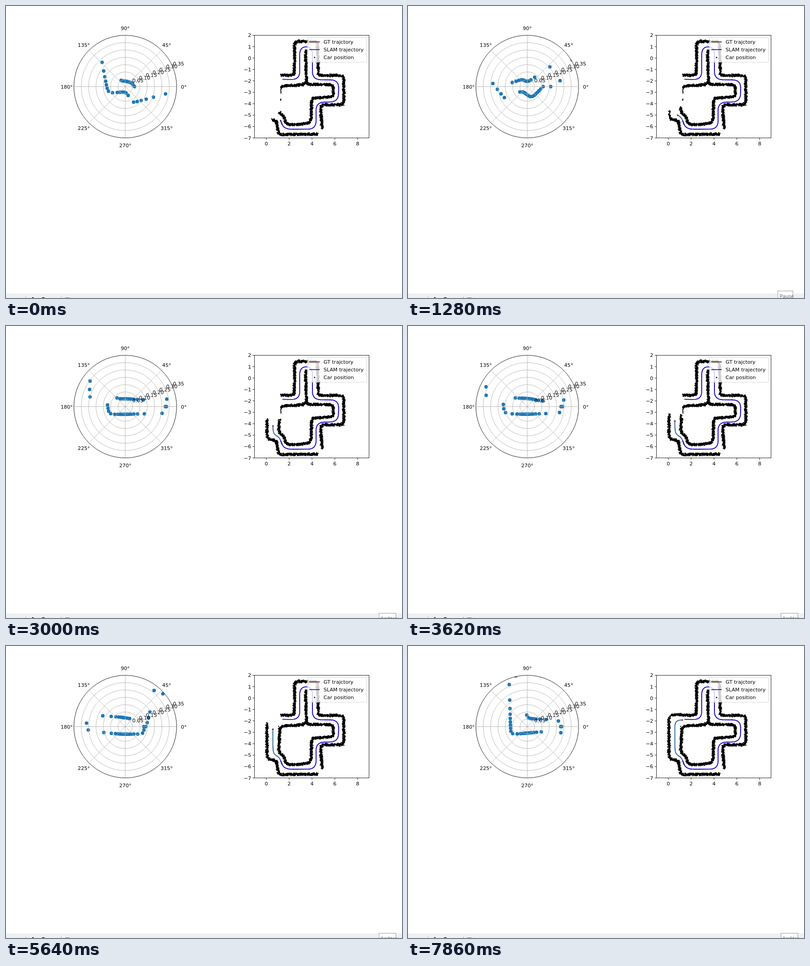
Animation, 871 px wide and 643 px high, one loop 8000 ms. Source, as an HTML page with a canvas:

```html
<!DOCTYPE html>
<html lang="en">
<head>
<meta charset="utf-8">
<title>Lidar scan and SLAM map</title>
<style>
  html, body { margin: 0; width: 871px; height: 643px; overflow: hidden; background: #fff; }
  canvas, svg { position: absolute; left: 0; top: 0; }
  text { font: 11.1px "DejaVu Sans", sans-serif; }
  .mid { text-anchor: middle; }
  .end { text-anchor: end; }
  .grid { fill: none; stroke: #b0b0b0; stroke-width: .89; }
  .axis { fill: none; stroke: #000; stroke-width: .89; }
  .path { fill: none; stroke-width: 1.67; stroke-linejoin: round; }
  .tip rect { fill: #fff; stroke: #9a9a9a; }
  .tip text { font: 11px "Open Sans", sans-serif; fill: #575757; }
</style>
</head>
<body>
<canvas id="stage" width="871" height="643"></canvas>
<svg width="871" height="643" viewBox="0 0 871 643">
  <g id="polar"></g>
  <g id="chart"></g>
  <g id="legend">
    <rect x="663" y="69.5" width="130" height="54.5" rx="2.2" fill="#fff" fill-opacity=".8" stroke="#ccc" stroke-opacity=".8"/>
    <path class="path" stroke="#5a0a0a" d="M667 79H690"/>
    <path class="path" stroke="#00f" d="M667 96H690"/>
    <circle cx="678.7" cy="113.3" r="1.6" fill="#700"/>
    <text x="698.5" y="83">GT trajctory</text>
    <text x="698.5" y="100">SLAM trajectory</text>
    <text x="698.5" y="117">Car position</text>
  </g>
  <g id="toolbar">
    <rect y="633" width="871" height="10" fill="#f0f0f0"/>
    <path d="M43.5 640V643M121.5 640V643" stroke="#a8a8a8"/>
    <path d="M56.5 643L59 641L61.5 643Z"/>
    <path d="M78.5 643.5Q82 641 85.5 643.5" fill="none" stroke="#000" stroke-width="1.3"/>
    <path d="M130 642.5H140" stroke="#777"/>
    <path d="M3 642.5H6M27 642.5H30" stroke="#ddd"/>
  </g>
  <g class="tip" id="pause"><rect x="813.5" y="627.5" width="33" height="20"/><text x="817.5" y="643">Pause</text></g>
  <g class="tip" id="stop"><rect x="820.5" y="632.5" width="37" height="20"/><text x="823.5" y="648">Arrêter</text></g>
</svg>
<script>
const LOOP = 8000, CX = 262.3, CY = 177.5, R = 113, RING = R / 7;
const RAYS = 36, SCALE = 1.283, SPEED = .0136, SWEEP = 130, BEAT = 301.5;
const $ = id => document.getElementById(id);
const rad = deg => deg * Math.PI / 180;
const mix = (a, b, u) => a + (b - a) * u;
const pairs = line => line.slice(1).map((b, i) => [line[i], b]);
const gap = (a, b) => Math.hypot(b[0] - a[0], b[1] - a[1]);
const toward = (a, b, d) => {
  const u = Math.min(.5, d / gap(a, b));
  return [mix(a[0], b[0], u), mix(a[1], b[1], u)];
};

// polyline through the given corners, each rounded off
function rounded(corners, radius) {
  const line = [corners[0]];
  for (let i = 1; i < corners.length - 1; i++) {
    const c = corners[i], a = toward(c, corners[i - 1], radius), b = toward(c, corners[i + 1], radius);
    for (let u = 0; u <= 1; u += .125) {
      line.push([0, 1].map(k => mix(mix(a[k], c[k], u), mix(c[k], b[k], u), u)));
    }
  }
  return [...line, corners[corners.length - 1]];
}

const outer = rounded([[695, 270], [692, 218], [743, 217], [743, 153], [687, 153], [685, 78],
  [635, 78], [634, 153], [574, 151], [574, 249], [595, 252], [600, 283], [686, 282]], 8);
const inner = rounded([[659, 98], [661, 173], [720, 173], [720, 200], [672, 203], [671, 256],
  [648, 261], [617, 261], [609, 239], [600, 237], [602, 177], [656, 173], [661, 165]], 8);
const track = rounded([[608, 161.5], [646, 162], [646, 90], [674, 90], [674, 162], [732, 163],
  [731, 211], [682, 212], [682, 271], [612, 271.5], [604, 252]], 18);
const route = rounded([[604, 252], [600.5, 245], [589, 238], [587, 226], [587, 163], [620, 163]], 14);

// time, heading at the start and at the end of a sweep
const HEADINGS = [[0, 98, 105], [1280, 122, 136], [2200, 90, 91], [3620, 77, 92],
  [5640, 68, 91], [6640, 52, 72], [7860, 0, 2]];

function carAt(t) {
  let s = Math.max(0, t) * SPEED;
  for (const [a, b] of pairs(route)) {
    const d = gap(a, b);
    if (s < d) return [mix(a[0], b[0], s / d), mix(a[1], b[1], s / d)];
    s -= d;
  }
}

function headingAt(t, u) {
  const [a, b] = pairs(HEADINGS).find(p => t < p[1][0]) || pairs(HEADINGS).pop();
  const k = Math.min(1, (t - a[0]) / (b[0] - a[0]));
  return mix(mix(a[1], b[1], k), mix(a[2], b[2], k), Math.sin(u * Math.PI / 2));
}

const edges = [outer, inner].flatMap(pairs);
function cast([x, y], dir) {
  const dx = Math.cos(rad(dir)), dy = -Math.sin(rad(dir));
  let best = Infinity;
  for (const [a, b] of edges) {
    const ex = b[0] - a[0], ey = b[1] - a[1], det = dx * ey - dy * ex;
    if (!det) continue;
    const px = a[0] - x, py = a[1] - y;
    const dist = (px * ey - py * ex) / det, s = (px * dy - py * dx) / det;
    if (dist > 0 && s >= 0 && s <= 1) best = Math.min(best, dist);
  }
  return best;
}

let seed = 7;
const rnd = () => (seed = (seed * 16807) % 2147483647) / 2147483647;
const noise = () => (rnd() + rnd() - 1) * 3.6;

// noisy range hits along a wall
function scatter([a, b]) {
  const n = Math.ceil(gap(a, b) * 3.5);
  return Array.from({ length: n }, (_, i) =>
    [mix(a[0], b[0], i / n) + noise(), mix(a[1], b[1], i / n) + noise()]);
}

// a hit on the unmapped stretch appears once the car comes near it
const unmapped = ([x, y]) => y < 256 && x < (y < 234 ? 604 : 594);
function seenAt(dot) {
  const reach = 15.5 + rnd() * 6;
  let t = 0;
  while (t < LOOP && gap(carAt(t), dot) > reach) t += 100;
  return t;
}

const g = $("stage").getContext("2d");
const disc = (c, x, y, r) => { c.beginPath(); c.arc(x, y, r, 0, 7); c.fill(); };

const known = document.createElement("canvas");
known.width = 871;
known.height = 643;
const fresh = [];
for (const dot of edges.flatMap(scatter)) {
  if (unmapped(dot)) fresh.push([...dot, seenAt(dot)]);
  else disc(known.getContext("2d"), ...dot, 1.3);
}

function makePolar() {
  let s = "";
  for (let a = 0; a < 360; a += 45) {
    const c = Math.cos(rad(a)), n = Math.sin(rad(a));
    s += `<path class="grid" d="M${CX} ${CY}L${CX + R * c} ${CY - R * n}"/>`;
    s += `<text class="mid" x="${CX + 128.8 * c}" y="${CY + 4 - 129 * n}">${a}°</text>`;
  }
  for (let i = 1; i <= 7; i++) {
    const r = RING * i, x = CX + r * Math.cos(rad(22.5)), y = CY - r * Math.sin(rad(22.5));
    s += `<circle class="${i < 7 ? "grid" : "axis"}" cx="${CX}" cy="${CY}" r="${r}"/>`;
    s += `<text x="${x + .5}" y="${y - 3}">${(i * .05).toFixed(2)}</text>`;
  }
  $("polar").innerHTML = s;
}

function makeChart() {
  const d = "M" + track.join("L");
  let s = `<path class="path" stroke="#5a0a0a" d="${d}"/><path class="path" stroke="#00f" stroke-opacity=".9" d="${d}"/>`;
  s += `<rect class="axis" x="546.5" y="64.5" width="252" height="226"/>`;
  for (let v = 0; v <= 8; v += 2) {
    const x = 572.5 + 25.13 * v;
    s += `<path class="axis" d="M${x} 290.5v4"/><text class="mid" x="${x}" y="307">${v}</text>`;
  }
  for (let v = -7; v <= 2; v++) {
    const y = 114.7 - 25.12 * v;
    s += `<path class="axis" d="M546.5 ${y}h-4"/><text class="end" x="539.3" y="${y + 4}">${v < 0 ? "\u2212" : ""}${Math.abs(v)}</text>`;
  }
  $("chart").innerHTML = s;
}

function drawScan(t) {
  g.save();
  g.beginPath();
  g.arc(CX, CY, R, 0, 7);
  g.clip();
  g.fillStyle = "#1f77b4";
  for (let i = 0; i < RAYS; i++) {
    const u = i / (RAYS - 1), a = u * 360;
    const r = SCALE * cast(carAt(t - SWEEP * (1 - u)), headingAt(t, u) - a);
    if (r < R + 5) disc(g, CX + r * Math.cos(rad(a)), CY - r * Math.sin(rad(a)), 3.9);
  }
  g.restore();
}

function drawTrail(t) {
  g.beginPath();
  g.moveTo(606.5, 261);
  for (let s = 0; s < t; s += 40) g.lineTo(...carAt(s));
  g.lineTo(...carAt(t));
  for (const [width, colour] of [[2, "#a05a5a"], [1.7, "#1f77b4"]]) {
    g.lineWidth = width;
    g.strokeStyle = colour;
    g.stroke();
  }
}

function draw(t) {
  g.clearRect(0, 0, 871, 643);
  drawScan(t);
  g.drawImage(known, 0, 0);
  g.fillStyle = "#000";
  for (const [x, y, seen] of fresh) if (seen <= t) disc(g, x, y, 1.3);
  drawTrail(t);
  g.fillStyle = "#800000";
  disc(g, ...carAt(t), 1.6);
  $("pause").style.display = t >= 600 && t < 2700 ? "" : "none";
  $("stop").style.display = t >= 2700 ? "" : "none";
}

// two refreshes per beat, the second 100 ms after the first
function refreshTime(now) {
  const beat = Math.floor(now / BEAT) * BEAT;
  return now - beat < 100 ? beat : beat + 100;
}

makePolar();
makeChart();
let shown = -1;
function tick() {
  const t = refreshTime(performance.now() % LOOP);
  if (t !== shown) draw(shown = t);
  requestAnimationFrame(tick);
}
tick();
</script>
</body>
</html>
```
